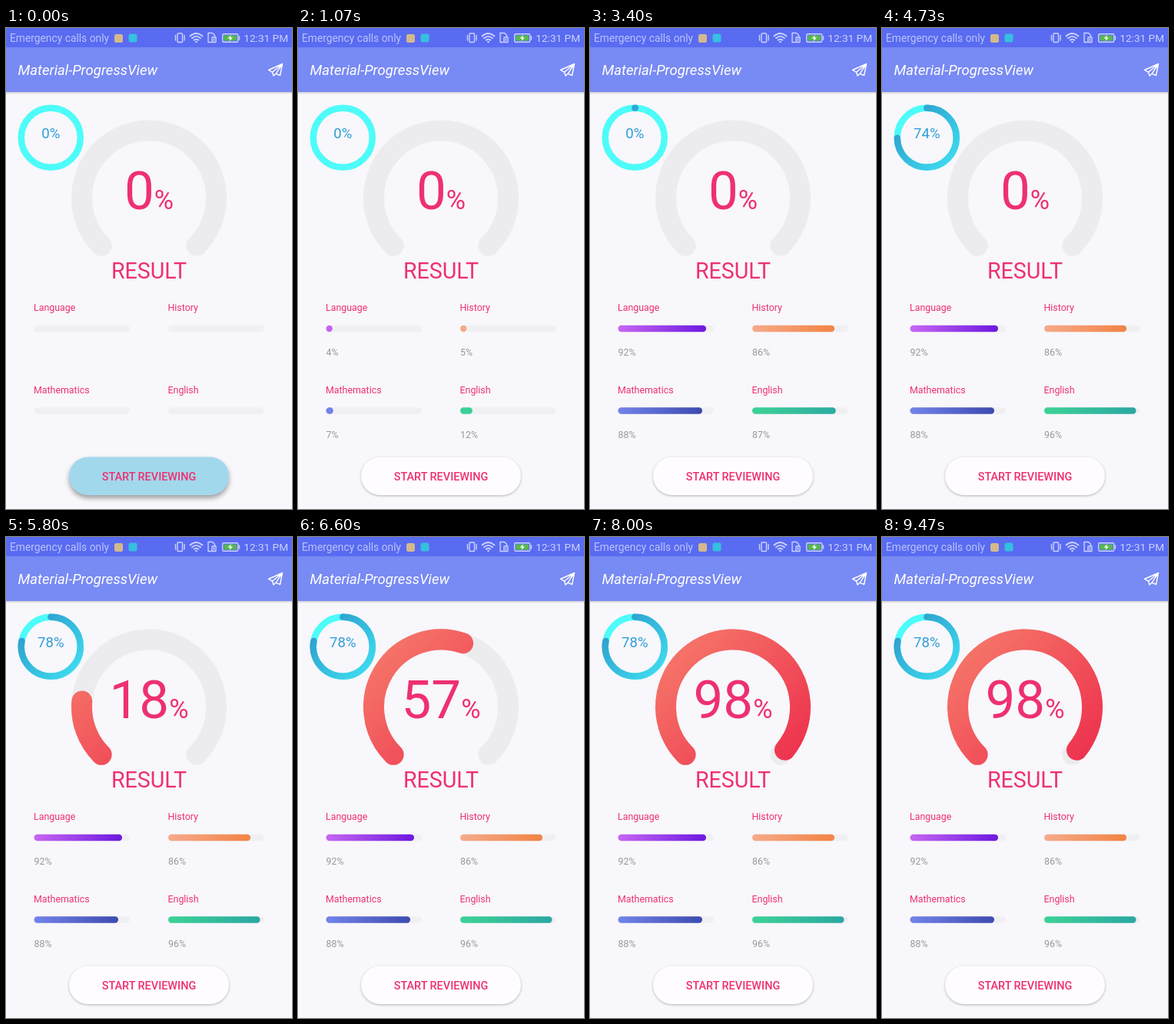
Recreate the animation shown at these times as an HTML page. Size 372x624 px, loop 9.54 s.

```html
<!DOCTYPE html>
<html lang="en">
<head>
<meta charset="utf-8">
<title>Progress views</title>
<style>
  html, body { margin: 0; width: 100%; height: 100%; overflow: hidden; background: #f8f7fb; }
  svg { display: block; width: 372px; height: 624px; font-family: Roboto, sans-serif; }
  .pink { fill: #ee3070; }
  .mid { text-anchor: middle; }
  .line { fill: none; stroke-linecap: round; stroke-linejoin: round; }
</style>
</head>
<body>
<svg id="stage" viewBox="0 0 372 624">
  <defs>
    <linearGradient id="red" gradientUnits="userSpaceOnUse" x1="85" y1="119" x2="287" y2="321">
      <stop stop-color="#f7806d"/><stop offset="1" stop-color="#ec2649"/>
    </linearGradient>
    <linearGradient id="blue" gradientUnits="userSpaceOnUse" x1="15" y1="99" x2="101" y2="185">
      <stop stop-color="#2a90c6"/><stop offset="1" stop-color="#42e4f4"/>
    </linearGradient>
    <linearGradient id="shade" x2="0" y2="1">
      <stop stop-color="#000" stop-opacity=".18"/><stop offset="1" stop-color="#000" stop-opacity="0"/>
    </linearGradient>
  </defs>
  <rect width="372" height="624" fill="#f8f7fb"/>

  <!-- status bar and toolbar -->
  <rect y="83" width="372" height="3" fill="url(#shade)"/>
  <rect width="372" height="83" fill="#788af3"/>
  <rect width="372" height="25" fill="#596bf1"/>
  <text x="5" y="18" font-size="13.8" fill="#bac3fb">Emergency calls only</text>
  <rect x="141" y="8" width="11" height="11" rx="2.5" fill="#d3b98c"/>
  <rect x="159.500" y="7.500" width="11" height="11" rx="2.500" fill="#36bfe0"/>
  <g class="line" stroke="#ccd3fd" stroke-width="1.4">
    <rect x="223" y="7" width="6.500" height="11.500" rx="1"/>
    <path d="M220.500 9.500v6.500M232 9.500v6.500"/>
    <path d="M239.500 10.500q8-7 16 0M242 13.200q5.500-4.700 11 0M244.700 15.800q2.800-2.300 5.600 0" stroke-width="1.8"/>
    <path d="M267 18.500h-4v-12h5.500l3 3v2"/>
    <rect x="268" y="12" width="5" height="6.500" rx=".5"/>
    <path d="M270.500 14v2.500"/>
    <rect x="281.700" y="7.700" width="20" height="10.500" rx="1.5"/>
    <path d="M303.500 11v4"/>
  </g>
  <circle cx="247.500" cy="18" r="1.300" fill="#ccd3fd"/>
  <rect x="283.500" y="9.500" width="16.500" height="7" fill="#57b94c"/>
  <path d="M293 9l-4.500 4.500h3l-1 3.500 4.500-4.500h-3z" fill="#fff"/>
  <text x="367" y="18" font-size="13.6" text-anchor="end" fill="#cdd3fd">12:31 PM</text>
  <text x="15.500" y="61" font-size="18.6" font-style="italic" fill="#fff">Material-ProgressView</text>
  <path class="line" d="M359.500 46.500L341.500 54.500 346.500 57.300 348 62 351 59.300 356.500 61.500zM359.500 46.500L346.500 57.300M359.500 46.500L351 59.300" stroke="#fff" stroke-width="1.4"/>

  <!-- rings -->
  <g class="line">
    <path id="bigTrack" stroke="#ececee" stroke-width="27"/>
    <path id="bigArc" stroke="url(#red)" stroke-width="27"/>
    <circle cx="58.300" cy="142.200" r="38.500" stroke="#4dfcf9" stroke-width="8.500"/>
    <path id="smallArc" stroke="url(#blue)" stroke-width="8.500"/>
  </g>
  <text id="smallText" class="mid" x="58.300" y="142.500" font-size="18.6" fill="#2f9fd6"></text>
  <text class="pink mid" x="186" y="234.500" font-size="69"><tspan id="bigText"></tspan><tspan font-size="34.5">%</tspan></text>
  <text class="pink mid" x="186" y="325" font-size="28.6">RESULT</text>

  <g id="bars"></g>

  <!-- button -->
  <rect id="button" x="82" y="556.500" width="208" height="49.500" rx="24.700"/>
  <text class="pink mid" x="186" y="587" font-size="14.45" font-weight="500">START REVIEWING</text>
</svg>
<script>
const LOOP = 9540;
const CLICK = 672;
const TRACK = 124.5;
const $ = id => document.getElementById(id);
const clamp = v => Math.min(1, Math.max(0, v));
const linear = x => x;
const smooth = x => (1 - Math.cos(Math.PI * x)) / 2;
const tween = (t, start, length, ease) => ease(clamp((t - start) / length));
const mix = (a, b, k) => a + (b - a) * k;

function add(parent, tag, attrs, text) {
  const el = document.createElementNS("http://www.w3.org/2000/svg", tag);
  for (const key in attrs) el.setAttribute(key, attrs[key]);
  if (text) el.textContent = text;
  parent.appendChild(el);
  return el;
}

function arc(cx, cy, r, from, sweep) {
  const at = deg => {
    const a = deg * Math.PI / 180;
    return (cx + r * Math.cos(a)).toFixed(3) + " " + (cy + r * Math.sin(a)).toFixed(3);
  };
  return `M${at(from)}A${r} ${r} 0 ${sweep > 180 ? 1 : 0} 1 ${at(from + sweep)}`;
}

const bars = [
  { name: "Language", x: 36.5, y: 390, goal: 92, length: 2725, ease: smooth, from: "#c766f2", to: "#6412de" },
  { name: "History", x: 211, y: 390, goal: 86, length: 2455, ease: smooth, from: "#f6aa8b", to: "#f17d38" },
  { name: "Mathematics", x: 36.5, y: 496.5, goal: 88, length: 2115, ease: smooth, from: "#7283ea", to: "#3643a8" },
  { name: "English", x: 211, y: 496.5, goal: 96, length: 3000, ease: linear, from: "#3dd396", to: "#2aa5a2" }
];

bars.forEach((b, i) => {
  const g = $("bars");
  const grad = add(g, "linearGradient", { id: "bar" + i, gradientUnits: "userSpaceOnUse", x1: b.x, x2: b.x + TRACK, y1: 0, y2: 0 });
  add(grad, "stop", { offset: 0, "stop-color": b.from });
  add(grad, "stop", { offset: 1, "stop-color": b.to });
  const box = { x: b.x, y: b.y - 4.2, width: TRACK, height: 8.4, rx: 4.2 };
  add(g, "text", { class: "pink", x: b.x - 0.5, y: b.y - 23, "font-size": 12.4 }, b.name);
  add(g, "rect", { ...box, fill: "#f0f0f2" });
  b.fill = add(g, "rect", { ...box, fill: `url(#bar${i})` });
  b.label = add(g, "text", { x: b.x, y: b.y + 35, "font-size": 12.4, fill: "#98989c" });
});

$("bigTrack").setAttribute("d", arc(186, 220.5, 87.5, 135, 270));

function drawArc(id, cx, cy, r, from, sweep) {
  $(id).setAttribute("d", sweep > 0 ? arc(cx, cy, r, from, sweep) : "");
}

function draw(t) {
  for (const b of bars) {
    const value = b.goal * tween(t, CLICK, b.length, b.ease);
    b.fill.setAttribute("width", value > 0 ? Math.max(8.4, TRACK * value / 100) : 0);
    b.label.textContent = value > 0 ? Math.floor(value + 1e-6) + "%" : "";
  }

  const small = 78 * tween(t, 3340, 1600, smooth);
  drawArc("smallArc", 58.3, 142.2, 38.5, -90, small * 3.6);
  $("smallText").textContent = Math.floor(small + 1e-6) + "%";

  const big = 98 * tween(t, 4943, 3000, smooth);
  drawArc("bigArc", 186, 220.5, 87.5, 135, big * 2.7);
  $("bigText").textContent = Math.floor(big + 1e-6);

  // pressed button settles back to white after the click
  const press = 1 - tween(t, 620, 380, smooth);
  const tint = [[254, 162], [252, 216], [255, 236]].map(([a, b]) => Math.round(mix(a, b, press)));
  const button = $("button");
  button.setAttribute("fill", `rgb(${tint})`);
  button.style.filter = `drop-shadow(0 ${mix(1.5, 4, press)}px ${mix(1.5, 3, press)}px rgba(0,0,0,${mix(0.28, 0.36, press)}))`;
}

const start = performance.now();
function tick() {
  draw((performance.now() - start) % LOOP);
  requestAnimationFrame(tick);
}
draw(0);
requestAnimationFrame(tick);
</script>
</body>
</html>
```
